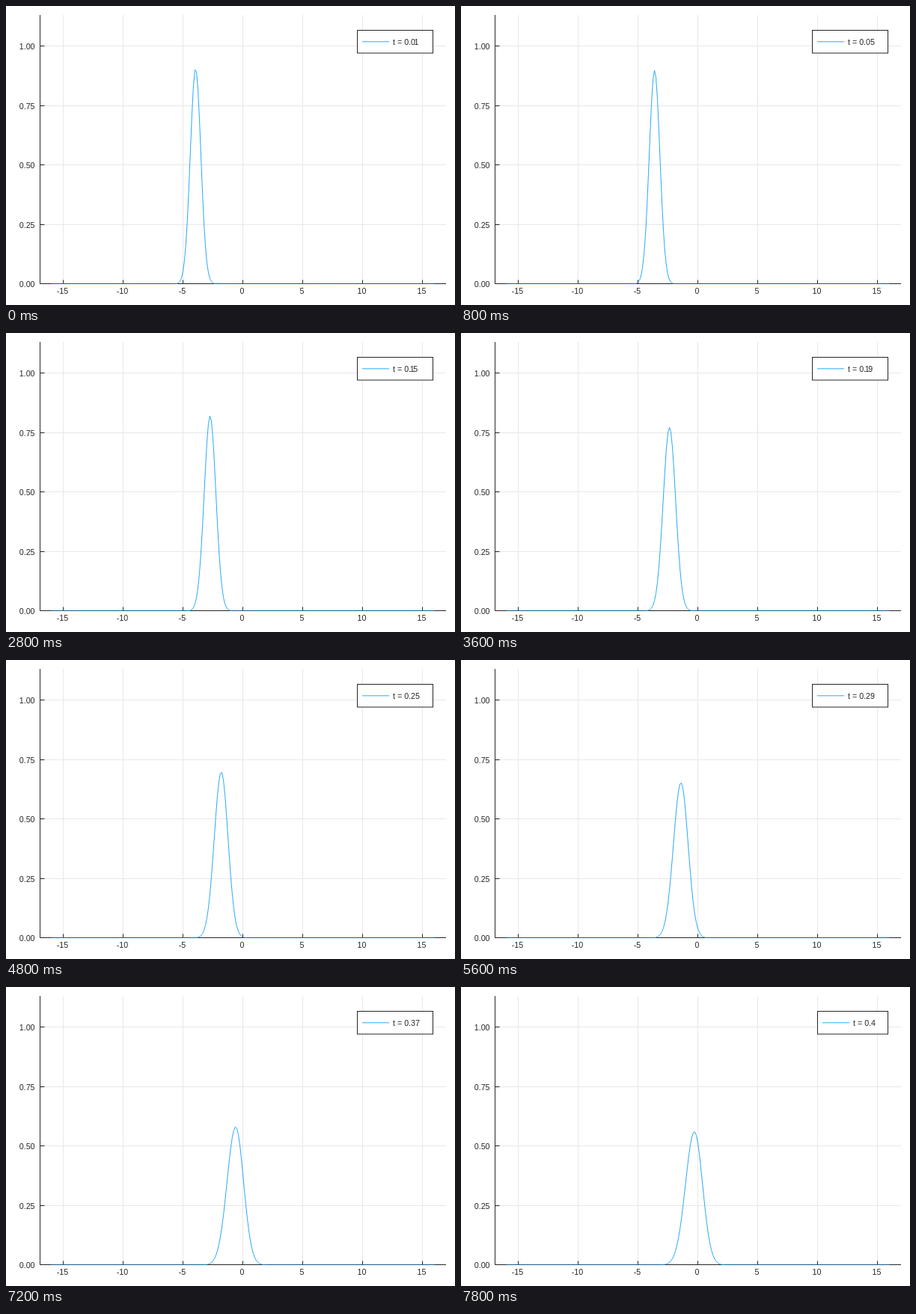
An HTML page for the animation above (8000 ms loop, 600 by 400 pixels).

```html
<!DOCTYPE html>
<html lang="en">
<head>
<meta charset="utf-8">
<title>Travelling wave packet</title>
<style>
  html, body { margin: 0; width: 100%; height: 100%; overflow: hidden; background: #fff; }
  svg { display: block; }
  text { font: 10.67px "Liberation Sans", Arial, sans-serif; fill: #262626; white-space: pre; }
  path { fill: none; }
  rect { fill: #fff; }
  .grid { stroke: #e8e8e8; }
  .axis { stroke: #262626; }
  .curve { stroke: #009afa; stroke-width: 0.85; stroke-linejoin: round; }
</style>
</head>
<body>
<svg width="600" height="400" viewBox="0 0 600 400">
  <clipPath id="plot"><path d="M45 12H588V372H45Z"/></clipPath>
  <g id="back"></g>
  <g id="axes"></g>
  <path id="wave" class="curve" clip-path="url(#plot)"/>
  <rect id="box" class="axis" y="32.5" height="30.5"/>
  <path id="key" class="curve"/>
  <text id="label" y="52"></text>
</svg>
<script>
const STEP_MS = 200, STEPS = 40;
const BASE = 371.5, TOP = 12, LEFT = 45.5, RIGHT = 588;
const $ = id => document.getElementById(id);
const px = x => 316.5 + 16 * x;
const py = y => 371.9 - 318.4 * y;
const snap = v => Math.floor(v) + 0.5;

function add(parent, tag, attrs, text = '') {
  const el = document.createElementNS('http://www.w3.org/2000/svg', tag);
  for (const name in attrs) el.setAttribute(name, attrs[name]);
  el.textContent = text;
  $(parent).append(el);
}
const line = (parent, d) =>
  add(parent, 'path', { d, class: parent === 'back' ? 'grid' : 'axis' });

function drawFrame() {
  for (let x = -15; x <= 15; x += 5) {
    const p = px(x);
    line('back', `M${p} ${TOP}V${BASE}`);
    line('axes', `M${p} ${BASE}v-5`);
    add('axes', 'text', { x: p - 1, y: 385, 'text-anchor': 'middle' }, x);
  }
  for (let y = 0; y <= 1; y += 0.25) {
    const p = snap(py(y));
    if (y) line('back', `M${LEFT} ${p}H${RIGHT}`);
    line('axes', `M${LEFT} ${p}h6`);
    add('axes', 'text', { x: 38.5, y: p + 4, 'text-anchor': 'end' }, y.toFixed(2));
  }
  line('axes', `M${LEFT} ${TOP}V${BASE}H${RIGHT}`);
}

// Accelerating, spreading Gaussian with a slightly longer trailing side.
function packet(t) {
  const center = -4.03 + 8.18 * t + 2.95 * t * t;
  const spread = 2.14 - 12.5 * (t - 0.28) ** 2;
  const sigma = Math.sqrt(0.1938 + spread * t * t);
  const skew = 0.3 * t * t;
  const height = 1 / (sigma * Math.sqrt(2 * Math.PI));
  return x => {
    const d = x - center;
    const width = sigma * (d < 0 ? 1 + skew : 1 - skew);
    return height * Math.exp(-d * d / (2 * width * width));
  };
}

function drawStep(step) {
  const t = (step + 1) / 100;
  const density = packet(t);
  const points = [];
  for (let x = -16; x <= 16; x += 0.125) {
    points.push(`${px(x)} ${py(density(x)).toFixed(2)}`);
  }
  $('wave').setAttribute('d', 'M' + points.join('L'));

  const shift = (step + 1) % 10 ? 0 : 7;
  $('box').setAttribute('x', 469.5 + shift);
  $('box').setAttribute('width', 101 - shift);
  $('key').setAttribute('d', `M${476 + shift} 47.8h36`);
  $('label').setAttribute('x', 517 + shift);
  // The digit 1 is set tight on both sides.
  const chars = [...`t = ${t}`];
  $('label').setAttribute('dx', chars.map((c, i) =>
    c === '1' || chars[i - 1] === '1' ? -1.4 : 0).join(' '));
  $('label').textContent = chars.join('');
}

drawFrame();
const start = performance.now();
let shown = -1;
function tick() {
  const step = Math.floor((performance.now() - start) / STEP_MS) % STEPS;
  if (step !== shown) drawStep(shown = step);
  requestAnimationFrame(tick);
}
tick();
</script>
</body>
</html>
```
